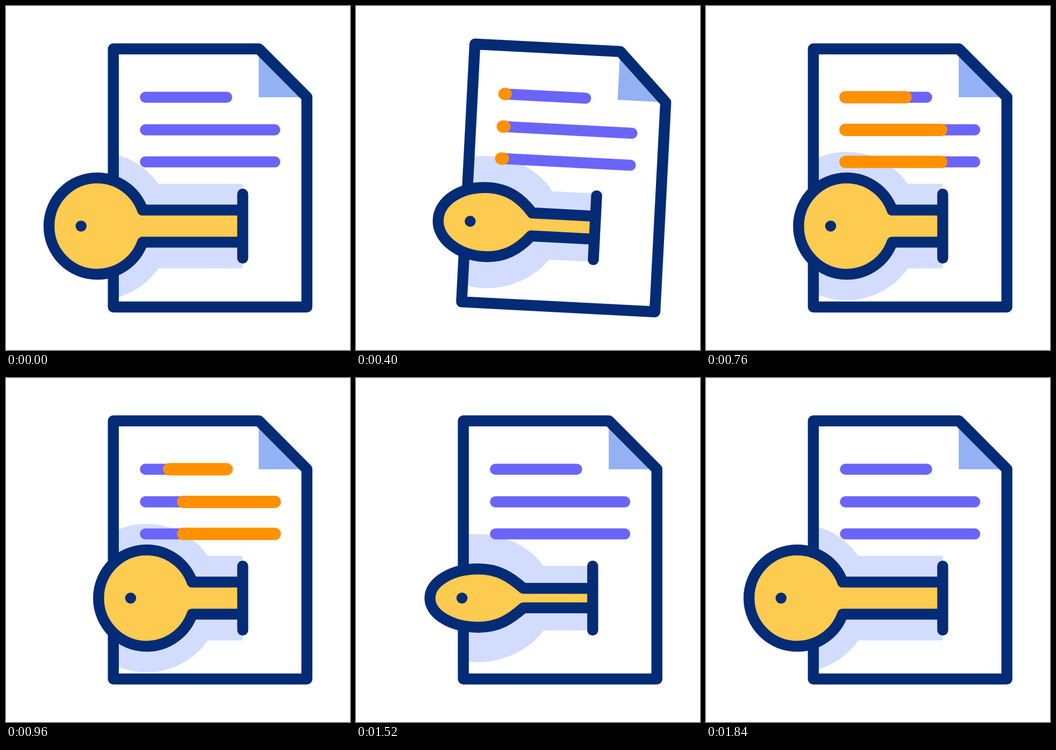
An HTML page with a canvas for the animation above (2 s loop, 640x640 px).

```html
<!DOCTYPE html>
<html lang="en">
<head>
<meta charset="utf-8">
<title>Document key</title>
<style>
  html, body { margin: 0; width: 100%; height: 100%; overflow: hidden; background: #fff; }
  canvas { display: block; }
</style>
</head>
<body>
<canvas width="640" height="640"></canvas>
<script>
const ctx = document.querySelector('canvas').getContext('2d');
const NAVY = '#042b76', YELLOW = '#fdcb50', SHADE = '#d2ddfe';
const FOLD = '#93b1f3', PURPLE = '#6a65f8', ORANGE = '#ff9100';
const LOOP = 2000, STEP = 40, CY = 409.5;
const LINES = [[259.5, 410.5, 169.7], [259.5, 500, 230.4], [259.5, 500, 290]];
const page = new Path2D('M199.7 79.7H470.5L559.8 169.5V560H199.7Z');
const fold = new Path2D('M470.2 79.7V169.7H559.8Z');

const ease = (t, from, to) => {
  const x = Math.min(1, Math.max(0, (t - from) / (to - from)));
  return x * x * (3 - 2 * x);
};
// Rises from 0 to 1 at the peak, then falls back
const pulse = (t, from, peak, to) => ease(t, from, peak) - ease(t, peak, to);

function stroke(color, width, path) {
  ctx.strokeStyle = color;
  ctx.lineWidth = width;
  ctx.stroke(path);
}

function fill(color, path) {
  ctx.fillStyle = color;
  ctx.fill(path);
}

function segment(color, width, x1, y1, x2, y2) {
  stroke(color, width, new Path2D(`M${x1} ${y1}L${x2} ${y2}`));
}

// Bow of radii rx, ry with a shaft that leaves it at the neck (nx, ny);
// (hx, hy) is the curve handle at the neck, top the handle at the crown
function keyShape(cx, rx, ry, nx, ny, hx, hy, top) {
  const p = new Path2D(), k = 0.5523, n = cx + nx;
  p.moveTo(440, CY - ny);
  p.lineTo(n, CY - ny);
  p.bezierCurveTo(n - hx, CY - ny - hy, cx + top, CY - ry, cx, CY - ry);
  p.bezierCurveTo(cx - k * rx, CY - ry, cx - rx, CY - k * ry, cx - rx, CY);
  p.bezierCurveTo(cx - rx, CY + k * ry, cx - k * rx, CY + ry, cx, CY + ry);
  p.bezierCurveTo(cx + top, CY + ry, n - hx, CY + ny + hy, n, CY + ny);
  p.lineTo(440, CY + ny);
  return p;
}

function draw(t) {
  const cx = 169.6 + 92.2 * (ease(t, 80, 560) - ease(t, 1320, 1800));
  const tilt = pulse(t, 80, 320, 560);
  const squash = pulse(t, 80, 306, 560) + pulse(t, 1320, 1546, 1800);
  const dip = tilt + pulse(t, 1320, 1560, 1800);
  const flat = 1 - 0.41 * squash;

  ctx.clearRect(0, 0, 640, 640);
  ctx.save();
  ctx.lineCap = ctx.lineJoin = 'round';
  ctx.translate(380 + 12 * tilt, 320);
  ctx.rotate(4 * tilt * Math.PI / 180);
  ctx.translate(-380, -320);

  fill('#fff', page);
  ctx.save();
  ctx.clip(page);
  fill(SHADE, keyShape(cx, 138, 138 - 20.3 * dip, 113.6 + 8.7 * dip,
    78.7 - 20.3 * dip, 25.8, 37.1, 45.2));
  ctx.restore();
  fill(FOLD, fold);
  stroke(NAVY, 20.4, page);

  const head = ease(t, 360, 960), tail = ease(t, 760, 1320);
  for (const [x1, x2, y] of LINES) {
    const w = x2 - x1;
    segment(PURPLE, 20.6, x1, y, x2, y);
    if (head > tail) segment(ORANGE, 23, x1 + w * tail, y, x1 + w * head, y);
  }

  const key = keyShape(cx, 89.6, 89.6 * flat, 84.5, 29.9 * flat,
    12.6 + 13 * squash, 35.7 * flat, 37.9);
  fill(YELLOW, key);
  stroke(NAVY, 20.4, key);
  segment(NAVY, 20.4, 440.4, 350, 440.4, 469);
  segment(NAVY, 20.4, cx - 30, CY, cx - 29.9, CY);
  ctx.restore();
}

const start = performance.now();
function tick() {
  const t = (performance.now() - start) % LOOP;
  draw(Math.floor(t / STEP) * STEP);
  requestAnimationFrame(tick);
}
tick();
</script>
</body>
</html>
```
